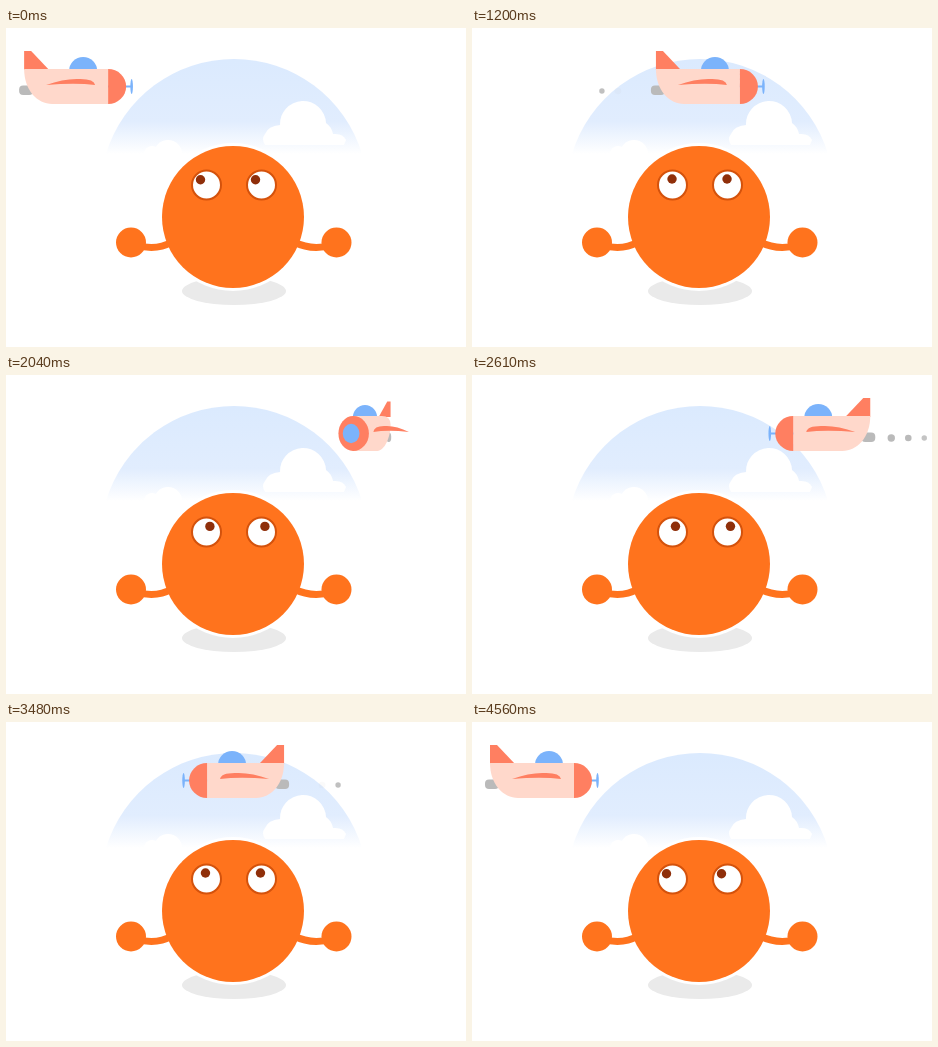
Recreate the animation shown at these times as an HTML page. Size 460 by 319 pixels, loop 4590 ms.

```html
<!DOCTYPE html>
<html lang="en">
<head>
<meta charset="utf-8">
<title>Plane watcher</title>
<style>
  html, body { margin: 0; width: 100%; height: 100%; overflow: hidden; background: #fff; }
  svg { display: block; width: 460px; height: 319px; }
  .coral { fill: #ff7f61; }
  .blue { fill: #7bb3fb; }
  .smoke { fill: #bababa; }
  .skin { fill: #ff731d; }
  .arm { fill: none; stroke: #ff731d; stroke-width: 7; }
  .eye { fill: #fff; stroke: #d4520c; stroke-width: 2; }
  .pupil { fill: #8f2f0a; }
</style>
</head>
<body>
<svg viewBox="0 0 460 319">
  <defs>
    <linearGradient id="sky" x1="0" y1="33" x2="0" y2="126" gradientUnits="userSpaceOnUse">
      <stop offset="0" stop-color="#dbeafe"/>
      <stop offset=".65" stop-color="#e1edfe"/>
      <stop offset="1" stop-color="#fff"/>
    </linearGradient>
  </defs>

  <path fill="url(#sky)" d="M100 126A133.7 133.7 0 0 1 356 126Z"/>
  <g fill="#fff">
    <path d="M259 117Q255 111 259 106Q262 98 274 97A23 23 0 0 1 320 95A17 17 0 0 1 327 106Q337 105 340 112L338 117Z"/>
    <circle cx="162" cy="126" r="14"/>
    <circle cx="146" cy="126" r="8"/>
  </g>

  <ellipse cx="228" cy="263" rx="52" ry="14" fill="#eaeaea"/>
  <circle cx="227" cy="189" r="74" fill="#fff"/>
  <path class="arm" d="M130 217Q150 223 166 214M326 217Q306 223 288 214"/>
  <circle class="skin" cx="125" cy="214.500" r="15"/>
  <circle class="skin" cx="330.500" cy="214.500" r="15"/>
  <circle class="skin" cx="227" cy="189" r="71"/>
  <circle class="eye" cx="200.500" cy="157" r="14.500"/>
  <circle class="eye" cx="255.500" cy="157" r="14.500"/>
  <g id="pupils">
    <circle class="pupil" cx="200" r="4.700"/>
    <circle class="pupil" cx="255" r="4.700"/>
  </g>

  <g id="dots" class="smoke">
    <circle cy="63" r="3.700"/>
    <circle cy="63" r="3.300"/>
    <circle cy="63" r="2.700"/>
  </g>
  <path id="farWing" class="coral"/>
  <rect id="exhaust" class="smoke" y="57.500" height="9.500" rx="4"/>
  <path id="fin" class="coral"/>
  <ellipse id="canopy" class="blue" cy="43"/>
  <path id="hull" fill="#ffd8cb"/>
  <path id="shaft" stroke="#7bb3fb" stroke-width="2"/>
  <path id="nose" class="coral"/>
  <ellipse id="prop" class="blue" cy="58.500"/>
  <path id="nearWing" class="coral"/>
</svg>
<script>
const LOOP = 4590, TRIP = 4560, HALF = 2280;
const TURN = 640, TURNS = [1620, 3910];
const SMOKE_GAPS = [21, 38, 54];

const el = {};
document.querySelectorAll('[id]').forEach(n => el[n.id] = n);
const dots = [...el.dots.children];
const clamp = v => Math.min(1, Math.max(0, v));
const set = (node, attrs) => {
  for (const k in attrs) node.setAttribute(k, attrs[k]);
};

function wing(X, s, side) {
  const front = X(12) + 16 * s * side;
  const tip = X(-37) + 30 * s * side;
  const at = f => front + (tip - front) * f;
  return `M${tip} 57Q${at(.62)} 50 ${at(.3)} 51Q${at(.02)} 51 ${front} 57` +
    `Q${at(.4)} 54.5 ${tip} 57Z`;
}

function drawPlane(x, angle) {
  const c = Math.cos(angle), s = Math.abs(Math.sin(angle));
  const d = c < 0 ? -1 : 1, sweep = d > 0 ? 1 : 0;
  const X = u => x + u * c;                 // position along the fuselage
  const tail = -55.5 - 3.5 * c;
  const end = X(tail), hub = X(25);
  const r = Math.min(10 * s, 40 * Math.abs(c));

  set(el.hull, { d: `M${hub} 41H${end + d * r}Q${end} 41 ${end} ${41 + r}` +
    `C${end} 62 ${X(tail + 13)} 76 ${X(tail + 28)} 76H${hub}Z` });

  const bulge = 18 - 4 * Math.abs(Math.sin(2 * angle));
  set(el.nose, { d: `M${hub} 41A${bulge} 17.5 0 0 ${sweep} ${hub} 76` +
    `A${Math.max(.01, 18 * s)} 17.5 0 0 ${sweep} ${hub} 41Z` });

  const propX = X(48.5 - 22 * s);
  set(el.prop, { cx: propX, rx: Math.max(1.3, 9.5 * s), ry: 7.5 + 2.5 * s });
  set(el.shaft, { d: `M${hub} 58.5H${propX}` });
  set(el.canopy, { cx: x, rx: 14 - 2 * s, ry: 14 - s });

  const top = 23 + 4 * s;
  set(el.fin, { d: `M${end} ${top}H${X(tail + 7)}L${X(tail + 25)} 42H${end}Z` });

  const pipeA = end - d * 5 * (1 - s), pipeB = X(tail + 9);
  set(el.exhaust, { x: Math.min(pipeA, pipeB), width: Math.abs(pipeA - pipeB) });

  set(el.nearWing, { d: wing(X, s, -d) });
  set(el.farWing, { d: wing(X, s, d) });
  return { end, d };
}

function draw(t) {
  const trip = Math.min(t, TRIP);
  const x = 77 + 315 * (1 - Math.abs(trip - HALF) / HALF);
  const angle = Math.PI * TURNS.reduce((sum, at) => sum + clamp((t - at) / TURN), 0);
  // both turns swing the nose towards the viewer
  const { end, d } = drawPlane(x, angle);

  const leg = trip % HALF;
  dots.forEach((dot, i) => {
    const shown = clamp((leg - 130 - 75 * i) / 60) * clamp((1110 + 100 * i - leg) / 120);
    set(dot, { cx: end - d * SMOKE_GAPS[i], opacity: shown });
  });

  const look = (x - 242) / 30;
  set(el.pupils, { transform: `translate(${look} ${151 + .025 * look * look})` });
}

const start = performance.now();
function tick() {
  draw((performance.now() - start) % LOOP);
  requestAnimationFrame(tick);
}
tick();
</script>
</body>
</html>
```
